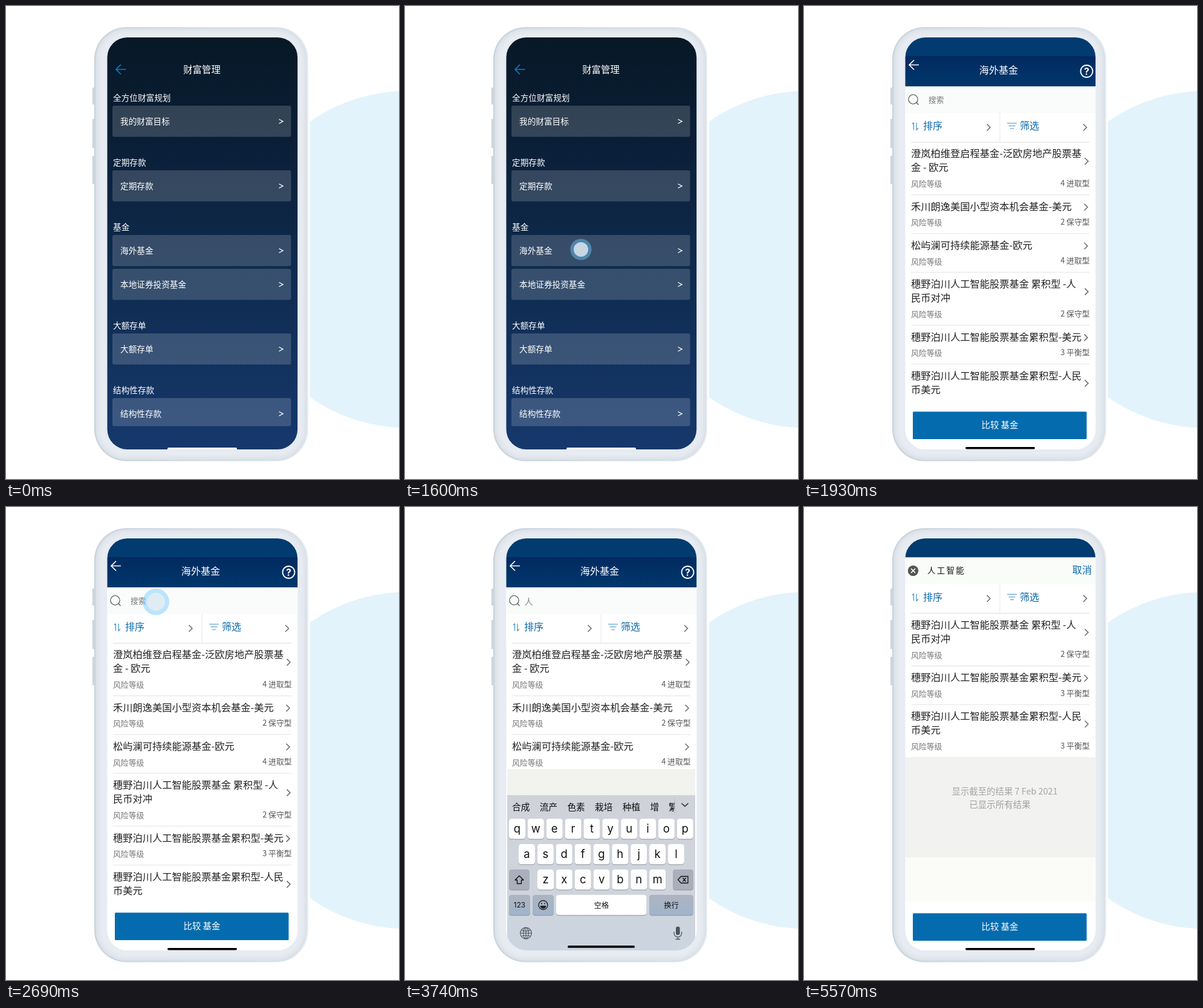
These frames come from a looping animation (650x783 px, 7.6 s). An HTML page:

```html
<!DOCTYPE html>
<html lang="zh-CN">
<head>
<meta charset="utf-8">
<style>
html, body { margin: 0; height: 100%; overflow: hidden; background: #fff; }
svg { display: block; width: 650px; height: 783px; }
text { font-family: "Noto Sans CJK SC", "Noto Sans CJK", sans-serif; }
.key { font-family: Inter, sans-serif; }
</style>
</head>
<body>
<svg id="stage" viewBox="0 0 650 783"></svg>
<script>
const LOOP = 7600, BLUE = '#0868ab';
const stage = document.getElementById('stage');

const rect = (x, y, w, h, fill, r = 0, more = '') =>
  `<rect x="${x}" y="${y}" width="${w}" height="${h}" rx="${r}" fill="${fill}" ${more}/>`;
const line = (d, color, width = 1.3, more = '') =>
  `<path d="${d}" fill="none" stroke="${color}" stroke-width="${width}" ${more}/>`;
const circle = (x, y, r, fill, more = '') =>
  `<circle cx="${x}" cy="${y}" r="${r}" fill="${fill}" ${more}/>`;
// y is the vertical middle of the glyphs
const text = (x, y, size, str, fill, more = '') =>
  `<text x="${x}" y="${y + size * 0.38}" font-size="${size}" fill="${fill}" ${more}>${str}</text>`;
const mid = 'text-anchor="middle"', end = 'text-anchor="end"';
const chevron = (x, y) => line(`M${x - 2.5} ${y - 5.5}l5.5 5.5l-5.5 5.5`, '#6b6b6b', 1.5);
const gradient = (id, dir, stops) =>
  `<linearGradient id="${id}" ${dir}>` +
  stops.map(([at, c]) => `<stop offset="${at}" stop-color="${c}"/>`).join('') + '</linearGradient>';
const down = 'x1="0" y1="0" x2="0" y2="1"';

function phone() {
  const layers = [[0, 'url(#edge)'], [2, '#d9e0e7'], [4, '#dfe5eb'], [7, '#e4e8ef'], [11, '#e7ebf2']];
  return circle(663, 419.5, 278.8, '#e2f3fb') +
    rect(498, 100, 5, 585, '#fcfdfd') +
    [[135, 28], [187, 48], [248, 47]].map(([y, h]) =>
      rect(143, y, 6, h, '#c5ced7', 1.5) + rect(144.5, y + 1, 4, h - 2, '#d6dde4', 1)).join('') +
    layers.map(([d, c]) => rect(146 + d, 35 + d, 354 - 2 * d, 718.5 - 2 * d, c, 53 - d)).join('');
}

function menuScreen() {
  const label = (y, s) => text(177, y, 13.65, s, '#fff');
  const card = (y, s, h = 51.5) => rect(176, y, 295.5, h, '#fff', 3, 'fill-opacity=".17"') +
    text(189, y + 26, 13.65, s, '#fff') + line(`M451.5 ${y + 22.5}l6.5 3.5l-6.5 3.5`, '#fff', 1.4);
  return rect(167, 52, 316, 683, 'url(#night)') +
    line('M198.5 105H182.5M190 97l-8 8l8 8', '#0f7ac8', 1.7) +
    text(324, 105, 15.4, '财富管理', '#fff', mid) +
    label(152, '全方位财富规划') + card(165, '我的财富目标') +
    label(259, '定期存款') + card(272, '定期存款') +
    label(366, '基金') + card(379, '海外基金') + card(435, '本地证券投资基金') +
    label(529, '大额存单') + card(542, '大额存单') +
    label(636, '结构性存款') + card(649, '结构性存款', 46.5) +
    rect(267, 731, 115, 6, '#fff', 2);
}

const sortBar = y => rect(167, y, 316, 48, '#fff') +
  line(`M324 ${y}v48`, '#ebebeb') + line(`M177 ${y + 48.5}H472`, '#e6e6e6') +
  line(`M181.5 ${y + 16}v12M179 ${y + 18.5}l2.5 -2.5M186 ${y + 16}v12l3 -3`, '#3f90c8', 1.2) +
  text(197, y + 21, 16.1, '排序', BLUE) + chevron(305, y + 24) +
  line(`M336 ${y + 17}h16M338.5 ${y + 21.5}h11M341 ${y + 26}h6`, '#3f90c8', 1.2) +
  text(357, y + 21, 16.1, '筛选', BLUE) + chevron(464.5, y + 24);

// Stacks fund rows downwards from y
function funds(y, list) {
  return list.map(([level, ...names]) => {
    const two = names.length > 1, extra = two ? 23.3 : 0;
    const row = names.map((s, i) => text(177, y + 19 + i * 23, 16.25, s, '#222')).join('') +
      chevron(two ? 467 : 466, y + (two ? 32 : 20.5)) +
      text(177, y + 46 + extra, 12.85, '风险等级', '#777') +
      text(472.5, y + 44.7 + extra, 12.8, level, '#555', end) +
      line(`M177 ${y + 64.2 + extra}H472`, '#e9e9e9');
    y += 64.2 + extra;
    return row;
  }).join('');
}

const growth = '4 进取型', careful = '2 保守型', balanced = '3 平衡型';
const others = [
  [growth, '澄岚柏维登启程基金-泛欧房地产股票基', '金 - 欧元'],
  [careful, '禾川朗逸美国小型资本机会基金-美元'],
  [growth, '松屿澜可持续能源基金-欧元']];
const matches = [
  [careful, '穗野泊川人工智能股票基金 累积型 -人', '民币对冲'],
  [balanced, '穗野泊川人工智能股票基金累积型-美元'],
  [balanced, '穗野泊川人工智能股票基金累积型-人民', '币美元']];

const footer = y => rect(167, y - 19, 316, 110, '#fff') +
  rect(180, y, 287.5, 45.5, '#046cae', 1.5) + text(324, y + 22, 14.4, '比较 基金', '#fff', mid) +
  rect(267, 730, 115, 3.6, '#000', 1.8);

function listScreen() {
  return rect(167, 52, 316, 683, '#fff') + rect(167, 52, 316, 31, '#013b6f') +
    rect(167, 83, 316, 50, 'url(#head)') +
    line('M190 97.5H174.5M182 89.5l-8 8l8 8', '#fff', 1.7) +
    text(322, 106, 16.1, '海外基金', '#fff', mid) +
    circle(467.5, 108, 10, 'none', 'stroke="#fff" stroke-width="1.8"') +
    `<text class="key" x="467.5" y="114" font-size="16" font-weight="700" fill="#fff" ${mid}>?</text>` +
    rect(167, 133, 316, 44, '#fafcfb') +
    circle(180.5, 154.5, 7.7, 'none', 'stroke="#444" stroke-width="1.1"') +
    line('M186 160l3.5 3.5', '#444', 1.1) +
    sortBar(177) + funds(225, [...others, ...matches]) + footer(671.5);
}

function keyboard() {
  const cap = (x, y, w, fill = '#fff') =>
    rect(x, y + 1, w, 33.5, '#8b9099', 4.5) + rect(x, y, w, 33.5, fill, 4.5);
  const letters = (s, cx, y) => [...s].map((c, i) => {
    const x = cx + i * 30.86;
    return cap(x - 13.5, y, 27) +
      `<text class="key" x="${x}" y="${y + 22.5}" font-size="18.5" fill="#111" ${mid}>${c}</text>`;
  }).join('');
  const words = ['合成', '流产', '色素', '栽培', '种植', '增'];
  const ink = '#4d535b';
  return rect(169, 434, 311, 43, '#f2f3ef') + rect(169, 477, 311, 258, 'url(#board)') +
    words.map((s, i) => text(177 + i * 45.7, 496, 14.7, s, '#111')).join('') +
    `<g clip-path="url(#cut)">${text(436, 496, 14.7, '繁', '#111')}</g>` +
    line('M446 483v24', '#b4b8c0', 1) + line('M457.5 490.5l5.5 5l5.5 -5', '#222', 1.5) +
    letters('qwertyuiop', 185.5, 516) + letters('asdfghjkl', 201.5, 558) + letters('zxcvbnm', 232.5, 600) +
    cap(172, 600, 34, '#a9afbb') + cap(443, 600, 34, '#a9afbb') +
    line('M189 610.5l7 7h-3.5v6h-7v-6h-3.5z', '#111', 1.4, 'stroke-linejoin="round"') +
    line('M451.5 617l5 -5.5h11.5v11h-11.5zM459.5 614l5 6m0 -6l-5 6', '#111', 1.3, 'stroke-linejoin="round"') +
    cap(172, 642, 35, 'url(#grey)') + cap(211, 642, 35, 'url(#grey)') +
    cap(250, 642, 149.5) + cap(404, 642, 73, 'url(#grey)') +
    `<text class="key" x="189.5" y="663" font-size="11.8" fill="#111" ${mid}>123</text>` +
    circle(228.5, 659, 7.5, 'none', 'stroke="#222" stroke-width="1.3"') +
    circle(226, 656.5, 1.1, '#222') + circle(231, 656.5, 1.1, '#222') +
    '<path d="M223.5 660h10a5 5 0 0 1 -10 0z" fill="#222"/>' +
    text(325, 659.5, 12.2, '空格', '#111', mid) + text(440.5, 659.5, 12.2, '换行', '#111', mid) +
    circle(200, 705.5, 9.3, 'none', `stroke="${ink}" stroke-width="1.2"`) +
    `<ellipse cx="200" cy="705.5" rx="4.4" ry="9.3" fill="none" stroke="${ink}" stroke-width="1.1"/>` +
    line('M200 696v19M190.7 705.5h18.6M192.5 700.5q7.5 3 15 0M192.5 710.5q7.5 -3 15 0', ink, 1.1) +
    rect(448, 694.5, 6.6, 14, ink, 3.3) +
    line('M445 703v2.500a6.300 6.300 0 0 0 12.600 0v-2.500M451.300 712v3.500M447.500 715.500h7.600', ink, 1.3) +
    rect(269, 726, 111, 3.8, '#000', 1.9);
}

function resultScreen() {
  return rect(167, 52, 316, 683, '#fff') + rect(167, 52, 316, 31.5, '#013b6f') +
    rect(167, 83.5, 316, 43.5, '#fafcfa') +
    circle(180.5, 105.5, 8.7, '#555') + line('M177 102l7 7m0 -7l-7 7', '#fff', 1.7) +
    text(204, 105, 13.4, '人工智能', '#111', 'font-weight="500" letter-spacing="2.4"') +
    text(476, 104, 16.1, '取消', BLUE, end) +
    sortBar(127.5) + funds(175.5, matches) +
    rect(167, 414.500, 316, 166, '#f2f3f0') + rect(167, 580, 316, 74, '#fbfcf8') +
    text(332, 471, 14.4, '显示截至的结果 7 Feb 2021', '#a5a5a5', mid + ' font-weight="300"') +
    text(324, 492, 14.5, '已显示所有结果', '#a0a0a0', mid) +
    footer(672.5);
}

const group = (id, body) => `<g id="${id}">${body}</g>`;
stage.innerHTML = '<defs>' +
  gradient('edge', '', [[0, '#c9d1da'], [0.5, '#d5dce3'], [0.9, '#dce2e9'], [1, '#eceff4']]) +
  gradient('night', down, [[0, '#071826'], [0.25, '#0a1f37'], [0.6, '#0f2c51'], [1, '#16386c']]) +
  gradient('head', down, [[0, '#022a60'], [1, '#00386c']]) +
  gradient('board', down, [[0, '#d0d2d9'], [0.6, '#cfd4dc'], [1, '#cbd5e0']]) +
  gradient('grey', down, [[0, '#adb4c1'], [1, '#a0b4cb']]) +
  `<clipPath id="screen">${rect(167.5, 52, 314.7, 682, '#000', 33)}</clipPath>` +
  `<clipPath id="cut">${rect(430, 480, 16, 30, '#000')}</clipPath></defs>` +
  phone() + '<g clip-path="url(#screen)">' +
  group('menu', menuScreen()) + group('list', listScreen()) +
  group('hint', text(206, 155, 12.7, '搜索', '#777')) +
  group('keys', keyboard()) +
  group('query', [...'人工智能'].map((c, i) =>
    text(197.5 + i * 17.4, 157, 14.2, c, '#111', 'font-weight="500"')).join('')) +
  group('results', resultScreen()) + '</g>' +
  group('touch', circle(0, 0, 22, '#6ec8ff', 'fill-opacity=".46"') + circle(0, 0, 15, '#ebeef0', 'fill-opacity=".78"'));

const el = id => document.getElementById(id);
const [menu, list, hint, keys, query, results, touch] =
  ['menu', 'list', 'hint', 'keys', 'query', 'results', 'touch'].map(el);
const show = (node, on) => node.setAttribute('display', on ? 'inline' : 'none');
const typedAt = [3740, 4070, 4470, 4900];
const taps = [
  { x: 291, y: 403, from: 1230, move: 1300, to: 1900 },
  { x: 248, y: 157, from: 2560, move: 2690, to: 3080 }];

function draw() {
  const t = performance.now() % LOOP;
  const within = (a, b) => t >= a && t < b;
  show(menu, t < 1930);
  show(list, within(1930, 5570));
  show(hint, within(1930, 3110));
  show(keys, within(3110, 5570));
  show(query, within(3740, 5570));
  show(results, t >= 5570);
  typedAt.forEach((at, i) => show(query.children[i], t >= at));
  query.children[0].setAttribute('opacity', t < 3770 ? 0.5 : 1);

  const tap = taps.find(p => within(p.from, p.to));
  show(touch, tap);
  if (tap) {
    const p = Math.max(0, (t - tap.move) / (tap.to - tap.move));
    const size = 1 - 0.2 * Math.sin(Math.PI * p) ** 2;
    touch.setAttribute('transform', `translate(${tap.x} ${tap.y}) scale(${size})`);
  }
  requestAnimationFrame(draw);
}
draw();
</script>
</body>
</html>
```
